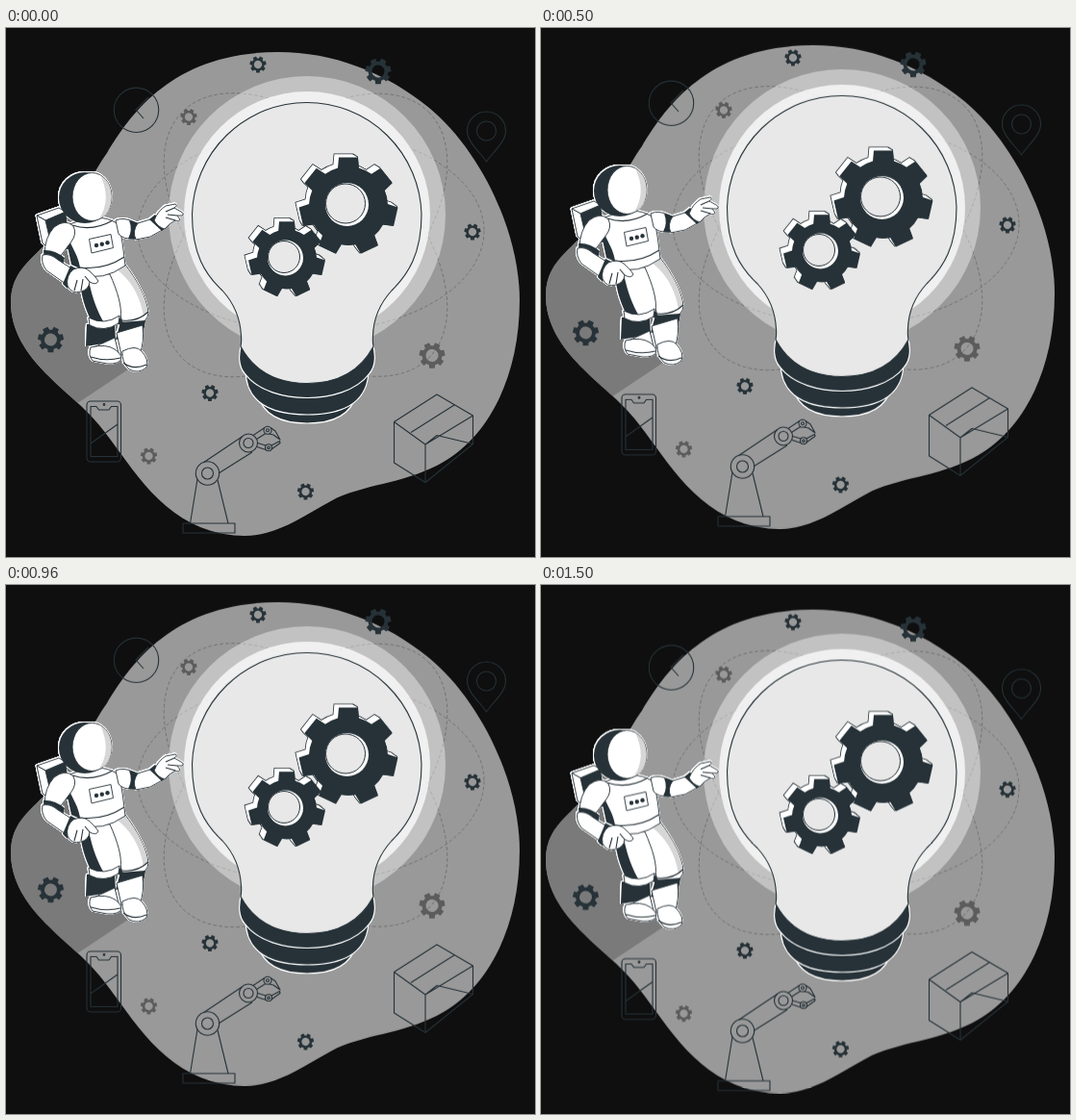
An HTML page for the animation above (1.54 s loop, 550 px wide and 550 px high).

```html
<!DOCTYPE html>
<html lang="en">
<head>
<meta charset="utf-8">
<title>Floating idea</title>
<style>
  html, body { margin: 0; width: 100%; height: 100%; overflow: hidden; background: #0f0f0f; }
  svg { display: block; width: 100%; height: 100%; }
  #scene { animation: float 1540ms linear -40ms infinite; }
  @keyframes float {
    0%, 100% { transform: translateY(.57px); }
    50% { transform: translateY(-10.43px); }
  }
  .orbit { fill: none; stroke: #707070; stroke-width: .9; stroke-dasharray: 3.5 2.5; }
  .line { fill: none; stroke: #263238; stroke-width: 1.1; stroke-linejoin: round; }
  .base { fill: #263238; stroke: #fff; stroke-width: 1.2; }
  .w { fill: #fff; stroke: #263238; stroke-width: .9; stroke-linejoin: round; }
  .d { fill: #263238; }
  .s { fill: #d6d6d6; }
  #astronaut {
    filter: drop-shadow(.7px 0 0 #fff) drop-shadow(-.7px 0 0 #fff)
      drop-shadow(0 .7px 0 #fff) drop-shadow(0 -.7px 0 #fff);
  }
</style>
</head>
<body>
<svg viewBox="0 0 550 550">
  <defs>
    <path id="blob" d="M283 25C340 25 395 46 440 83C492 126 534 210 534 283C534 365 500 425 455 451C417 473 380 473 344 488.500C311 506 283 528 248 528C165 527 132 455 97 413C70 378 5 345 5 285C5 252 29 240 44 221C75 187 90 150 105 130C130 88 175 25 283 25Z"/>
    <clipPath id="inBlob"><use href="#blob"/></clipPath>
  </defs>
  <g id="scene">
    <use href="#blob" fill="#999"/>
    <path clip-path="url(#inBlob)" fill="#7a7a7a" d="M92 150L118 250L130 353L73 391L0 400V150Z"/>

    <g class="orbit">
      <ellipse cx="317" cy="211" rx="180" ry="105"/>
      <ellipse cx="311.5" cy="215" rx="181" ry="103" transform="rotate(45 311.5 215)"/>
      <ellipse cx="311.5" cy="215.5" rx="181" ry="103" transform="rotate(-45 311.5 215.5)"/>
    </g>

    <g fill="#fff">
      <circle cx="313" cy="194" r="144" opacity=".4"/>
      <circle cx="313" cy="194" r="128" opacity=".75"/>
    </g>

    <!-- bulb -->
    <g class="base">
      <path d="M262 382Q270 411 313 411Q356 411 364 382Z"/>
      <path d="M249 355C249 392 280 402 313 402C346 402 377 392 377 355Z"/>
      <path d="M245 328C241 340 242 352 248 359C262 378 290 384.5 313 384.5C336 384.5 364 378 378 359C384 352 385 340 381 328Z"/>
    </g>
    <path fill="#e8e8e8" stroke="#263238" stroke-width="1.1" d="M193.5 193.500A119.3 119.500 0 0 1 432 193.500C432 235 418 256 401 273C390 285 382 300 381.5 320Q381 326 382 331C366 361 338 369.5 313 369.5S260 361 244 331Q245 326 244.5 320C243.5 300 236 285 225 273C207 256 193.5 235 193.5 193.500Z"/>
    <g id="wheels"></g>
    <g id="cogs"></g>

    <!-- line icons -->
    <g class="line">
      <circle cx="135.5" cy="85.3" r="23.2"/>
      <path d="M148 72L135 85L143 94"/>
      <path d="M499.5 139C494 130 479.5 119 479.5 107A20 20 0 0 1 519.5 107C519.5 119 505 130 499.5 139Z"/>
      <circle cx="499.5" cy="107" r="10"/>

      <rect x="84" y="388" width="35.5" height="63" rx="4"/>
      <path d="M88 393.5H94L96.5 397H107L109.5 393.5H116V445.5H88ZM88 432L116 412"/>
      <circle cx="102" cy="391.5" r=".9"/>

      <path d="M184 515H238V525H184ZM191.5 515L199 469M231 515L220 470M205 452L246 424.5M221 463L256 441"/>
      <circle cx="209.5" cy="463" r="12.2"/>
      <circle cx="209.5" cy="463" r="6"/>
      <circle cx="252" cy="431.5" r="9.5"/>
      <circle cx="252" cy="431.5" r="5"/>
      <path d="M257 423.5L269 415.5M260.5 427.5L270 421.5M261.5 431.5L270 434M261 435.5L270 438.5"/>
      <circle cx="272" cy="418.3" r="4"/><circle cx="272" cy="418.3" r="1.5"/>
      <circle cx="273" cy="436.3" r="3.5"/><circle cx="273" cy="436.3" r="1.3"/>
      <path d="M275 415.5L280 419L285 428L278 423L273.500 422M276 434L284.500 429.5L285 431.500L276 438"/>

      <path d="M403.5 409.5L448 381L485.5 403L436 433ZV452L436 472.5L485.5 432.5V403M436 433V472.5M421 420.5L466 392M436 433L448 423.5L485.5 432.5"/>
    </g>

    <g id="astronaut">
      <path class="d" d="M38 199L62 188L66 230L44 229Z"/>
      <path class="w" d="M32 195L55 187L62 191L41 200Z"/>
      <path class="w" d="M32 195L41 200L48 230L38 224Z"/>

      <path class="d" d="M98 258C112 272 119 290 122 310L112 306Z"/>
      <path class="w" d="M104 252L124 246C136 262 146 280 148 296Q147 306 137 308L121 306C117 290 108 275 104 252Z"/>
      <path class="s" d="M116 252L124 247C136 262 146 280 147.5 296L143 300C140 280 130 262 116 252Z"/>
      <path class="d" d="M119 306L145 304Q144 314 141 318L114 324Z"/>
      <path class="w" d="M115 317L142 309Q144 328 139 338L120 340Z"/>
      <path class="w" d="M121 336Q135 329 141 336Q149 345 146 353Q138 360 128 355Q120 347 121 336Z"/>
      <path class="line" d="M121 304Q136 306 148 295M122 348Q132 356 146 350"/>

      <path class="d" d="M84 308L113 307L114 326L83 331Z"/>
      <path class="w" d="M89 333L113 322L117 338L92 343Z"/>
      <path class="w" d="M88 332Q104 328 113 334Q122 340 119 346Q112 351 100 348L90 346Q85 340 88 332Z"/>
      <path class="w" d="M79 254L108 256C116 274 121 290 119 302Q112 311 98 307Q88 302 85 290C80 275 77 265 79 254Z"/>
      <path class="d" d="M77 250L85 258C89 278 94 294 103 308L88 303C80 287 76 270 77 250Z"/>
      <path class="w" d="M86 301Q102 310 118 299L117 307Q102 317 87 309Z"/>
      <path class="line" d="M88 342Q104 347 119 343"/>

      <path class="w" d="M66 204Q60 210 66 222C72 235 76 246 78 256Q100 264 124 247C122 232 121 218 117 204Q104 196 96 198L78 200Z"/>
      <path class="d" d="M62 218C70 228 76 240 77 250L68 246Z"/>
      <path class="line" d="M77 249Q102 252 123 238M69 205Q90 212 111 200"/>
      <path class="w" d="M86.5 219.5L109 214.5L111.5 228.5L89 234Z"/>
      <g class="d">
        <circle cx="94" cy="226" r="2.2"/><circle cx="99.8" cy="224.7" r="2.2"/><circle cx="105.5" cy="223.3" r="2.2"/>
      </g>

      <path class="w" d="M114 200Q122 196 134 202L133 219Q122 220 117 214Z"/>
      <path class="d" d="M128 200L139 203L137 220L127 219Q132 210 128 200Z"/>
      <path class="w" d="M137 203L153 198Q166 204 166 208L150 217L135 220Q131 211 137 203Z"/>
      <path class="d" d="M149 199L155 194L167 207L162 211Z"/>
      <path class="w" d="M154 200Q158 190 166 185L176 183Q179 184 175 187L182 191Q186 193 183 195L178 195L181 199Q180 202 176 200L170 204L165 209Q158 207 154 200Z"/>
      <path class="line" d="M166 191L175 187M168 194L178 195M166 197L176 200"/>

      <path class="w" d="M50 207Q62 198 70 206Q74 214 68 222L56 238L40 236Q40 218 50 207Z"/>
      <path class="d" d="M39 231Q50 230 61 239L58 250L40 241Z"/>
      <path class="w" d="M38 236Q36 244 42 252L62 266L68 250L54 241Q46 234 38 236Z"/>
      <path class="d" d="M59 266L67 247L73 250L64 271Z"/>
      <path class="w" d="M64 268Q62 258 70 251Q80 247 86 252Q93 258 96 263Q94 268 87 264Q86 272 78 274Q68 277 64 268Z"/>
      <path class="line" d="M71 273L74 262M78 273L80 261M87 264L82 258"/>

      <ellipse class="d" cx="82" cy="176.5" rx="27" ry="26.5"/>
      <ellipse class="w" cx="89.5" cy="175.5" rx="20.5" ry="25"/>
      <path class="s" d="M98 153Q111 161 109.500 180Q107 195 97 198Q110 178 98 153Z"/>
    </g>
  </g>
</svg>
<script>
  const DARK = '#263238', GREY = '#5c5c5c', TAU = 2 * Math.PI;
  const get = id => document.getElementById(id);

  // Seven-toothed outline around the origin, first tooth pointing up.
  function gear(body, tip, half) {
    const point = (turn, side, r) => {
      const x = side, y = -Math.sqrt(r * r - side * side);
      const c = Math.cos(turn), s = Math.sin(turn);
      return (x * c - y * s).toFixed(2) + ' ' + (x * s + y * c).toFixed(2);
    };
    const arc = `A${body} ${body} 0 0 1 `;
    let d = '';
    for (let i = 0; i < 7; i++) {
      const a = i * TAU / 7;
      d += (i ? arc : 'M') + point(a, -half * 1.1, body)
        + 'L' + point(a, -half, tip) + 'L' + point(a, half, tip) + 'L' + point(a, half * 1.1, body);
    }
    return d + arc + point(0, -half * 1.1, body) + 'Z';
  }

  // A solid wheel with its white side showing towards the upper left.
  function wheel(x, y, body, tip, half, hole) {
    const d = gear(body, tip, half);
    const side = style => [5, 4, 3, 2, 1].map(k =>
      `<path d="${d}" transform="translate(${-k} ${-k}) scale(${1 - k * .007})" ${style}/>`).join('');
    return `<g transform="translate(${x} ${y})">`
      + side(`fill="${DARK}" stroke="${DARK}" stroke-width="1.6"`)
      + side('fill="#fff"')
      + `<path d="${d}" fill="${DARK}"/>`
      + `<circle cx="-1.5" cy="-1.5" r="${hole}" fill="#fff"/>`
      + `<circle cx="-3" cy="-2.5" r="${hole - 2}" fill="#e8e8e8" stroke="${DARK}"/></g>`;
  }

  function cog(x, y, r, fill) {
    const h = r * .48;
    const hole = `M${-h} 0a${h} ${h} 0 1 0 ${2 * h} 0a${h} ${h} 0 1 0 ${-2 * h} 0Z`;
    return `<path transform="translate(${x} ${y}) rotate(26)" fill="${fill}" fill-rule="evenodd"
      d="${gear(r * .76, r, r * .21)}${hole}"/>`;
  }

  get('wheels').innerHTML = wheel(356, 185, 41, 51.5, 10, 22.5) + wheel(292, 240.5, 31, 40, 8, 18.5);
  get('cogs').innerHTML = [
    [262, 38, 8.7, DARK], [387, 45, 13.6, DARK], [190, 92.5, 8.7, GREY],
    [485, 212, 8.7, DARK], [46.5, 324, 13.6, DARK], [443, 340.5, 13.6, GREY],
    [212, 379.5, 8.7, DARK], [148.5, 445, 8.7, GREY], [311.5, 482, 8.7, DARK]
  ].map(c => cog(...c)).join('');
</script>
</body>
</html>
```
